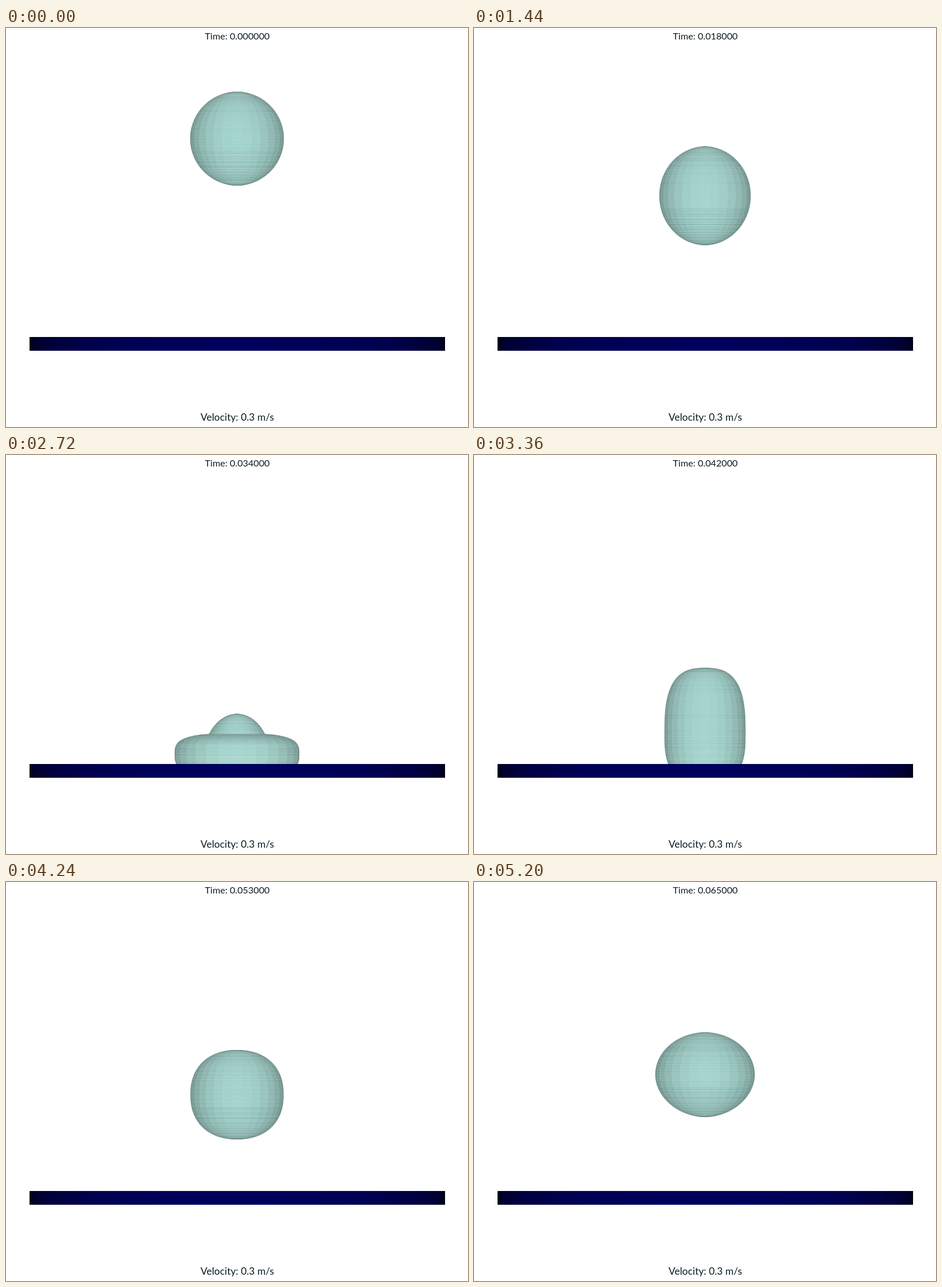
Write an HTML page with a canvas that moves like this. It is 805x696 px and loops after 5.24 s.

```html
<!DOCTYPE html>
<html>
<head>
<meta charset="utf-8">
<style>
  html, body { margin: 0; width: 100%; height: 100%; overflow: hidden; background: #fff; }
  canvas { display: block; }
</style>
</head>
<body>
<canvas id="stage" width="805" height="696"></canvas>
<script>
const ctx = document.getElementById('stage').getContext('2d');
const CX = 402.5, STEP = 40, STEPS = 131, RINGS = 90, SIDES = 15;
const RADIUS = 81.5, PLATE_Y = 539, CONTACT_Y = 457, IMPACT = 58.6, LIFT = 88;
const mix = (a, b, u) => a + (b - a) * u;

// A free drop keeps its volume: the height follows from width and roundness.
function flying(n, width, power) {
  const height = RADIUS ** 3 / width ** 2 * Math.sqrt(power);
  return { n, width, power, top: -height, equator: 0, bottom: height, capWidth: width, capTop: -height };
}

// Poses over time; heights are relative to the moving centre.
const poses = [
  flying(0, RADIUS, 1),
  flying(36, 79.5, 1),
  flying(51, 78.5, .92),
  flying(IMPACT, 79, .95),
  { n: 64, width: 93, power: .8, top: -12, equator: 44, bottom: 100, capWidth: 80, capTop: -36 },
  { n: 68, width: 108.5, power: .62, top: 29, equator: 65, bottom: 101, capWidth: 56, capTop: -5 },
  { n: 74, width: 118, power: .65, top: 34, equator: 63, bottom: 100, capWidth: 62, capTop: 24 },
  { n: 84, width: 70.5, power: .7, top: -85, equator: 30, bottom: 115, capWidth: 60, capTop: -85 },
  flying(98, 84, .95),
  flying(106, 81, .88),
  flying(114, 79.5, .95),
  flying(130, 86.5, 1.03)
];

// Fall from rest, stay on the plate, rise against gravity.
function centreY(n) {
  const m = n - 106;
  return Math.min(CONTACT_Y, n < 80 ? 193 + .0769 * n * n : 371 - 3.3 * m + .077 * m * m);
}

function poseAt(n) {
  const i = Math.max(1, poses.findIndex(p => p.n >= n));
  const a = poses[i - 1], b = poses[i], u = (n - a.n) / (b.n - a.n), pose = {};
  for (const key in a) pose[key] = mix(a[key], b[key], u);
  return pose;
}

// Radius of a superellipse at a fraction of its half height.
function ovalRadius(width, fraction, power) {
  return width * Math.max(0, 1 - Math.abs(fraction) ** (2 / power)) ** (power / 2);
}

// Outline from top to bottom: a body with a rounded cap on it.
function outline(n) {
  const p = poseAt(n), cy = centreY(n);
  const top = Math.min(p.top, p.capTop), end = Math.min(p.bottom, PLATE_Y + 1 - cy);
  return Array.from({ length: RINGS + 1 }, (_, i) => {
    const y = mix(top, end, (1 - Math.cos(Math.PI * i / RINGS)) / 2);
    const d = y - p.equator;
    const body = ovalRadius(p.width, d / ((d < 0 ? p.top : p.bottom) - p.equator), p.power);
    const cap = d < 0 ? ovalRadius(p.capWidth, d / (p.capTop - p.equator), 1) : 0;
    return [Math.max(body, cap), cy + y];
  });
}

function drawDrop(n) {
  const ring = outline(n);
  ctx.lineWidth = .3;
  for (let j = 0; j < RINGS; j++) {
    const [r0, y0] = ring[j], [r1, y1] = ring[j + 1];
    const slope = Math.sqrt((y1 - y0) / (Math.hypot(r1 - r0, y1 - y0) || 1));
    for (let k = 0; k < SIDES; k++) {
      const a = Math.PI * (k / SIDES - .5), b = a + Math.PI / SIDES;
      const light = slope * Math.cos((a + b) / 2);
      const rgb = [mix(102, 162, light), mix(130, 211, light), mix(126, 204, light)];
      ctx.fillStyle = ctx.strokeStyle = `rgb(${rgb.map(Math.round)})`;
      ctx.beginPath();
      ctx.moveTo(CX + r0 * Math.sin(a), y0);
      ctx.lineTo(CX + r0 * Math.sin(b), y0);
      ctx.lineTo(CX + r1 * Math.sin(b), y1);
      ctx.lineTo(CX + r1 * Math.sin(a), y1);
      ctx.closePath();
      ctx.fill();
      ctx.stroke();
    }
  }
  if (n < IMPACT || n > LIFT) drawStripes(ring, centreY(n));
}

// Fine irregular lines across the lower half.
function drawStripes(ring, cy) {
  ctx.save();
  ctx.beginPath();
  ring.forEach(([x, y]) => ctx.lineTo(CX + x, y));
  [...ring].reverse().forEach(([x, y]) => ctx.lineTo(CX - x, y));
  ctx.clip();
  const bottom = ring[RINGS][1];
  for (let y = Math.round(cy) + 22, i = 0; y < bottom - 2; i++) {
    ctx.fillStyle = `rgba(75,105,100,${.13 + .1 * Math.sin(i * 2.3)})`;
    ctx.fillRect(CX - 100, y, 200, 1);
    y += 3 + Math.round(Math.sin(i * 4.1));
  }
  ctx.restore();
}

function drawPlate() {
  const sides = 30, radius = 362;
  for (let k = 0; k < sides; k++) {
    const a = Math.PI * (k / sides - .5), b = a + Math.PI / sides;
    const x = Math.round(CX + radius * Math.sin(a)), end = Math.round(CX + radius * Math.sin(b));
    ctx.fillStyle = `rgb(0,0,${Math.round(92 * Math.cos((a + b) / 2) ** .55)})`;
    ctx.fillRect(x, PLATE_Y, end - x, 24);
  }
}

function label(text, y, size) {
  ctx.font = `${size}px Lato, sans-serif`;
  ctx.textAlign = 'center';
  ctx.fillStyle = '#0b1a22';
  ctx.fillText(text, CX + .5, y);
}

function draw(now) {
  const n = Math.floor(now / STEP) % STEPS;
  ctx.fillStyle = '#fff';
  ctx.fillRect(0, 0, 805, 696);
  drawDrop(n);
  drawPlate();
  label('Time: ' + (n * .0005).toFixed(6), 20, 16.2);
  label('Velocity: 0.3 m/s', 684.5, 17.4);
}

const start = performance.now();
function tick() {
  draw(performance.now() - start);
  requestAnimationFrame(tick);
}
tick();
</script>
</body>
</html>
```
